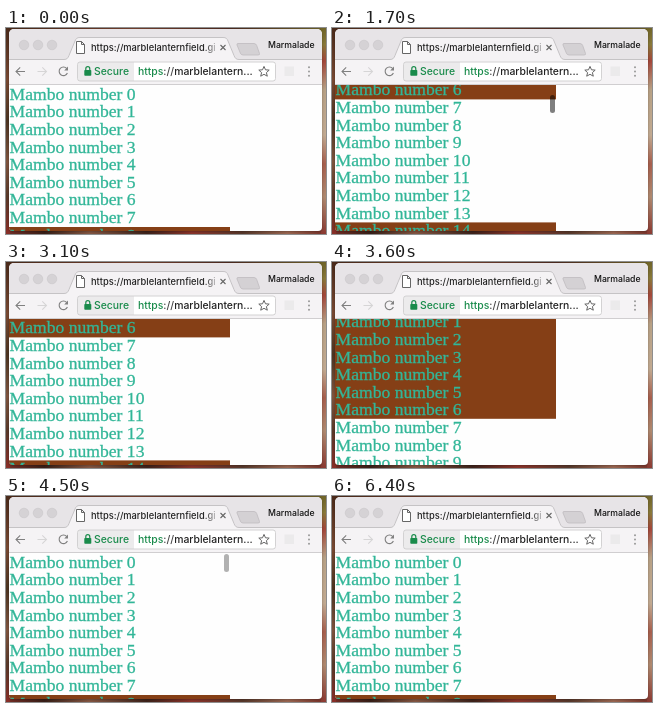
An HTML page that plays this animation: 320 by 206 pixels, repeating every 6500 ms.

```html
<!DOCTYPE html>
<html lang="en">
<head>
<meta charset="utf-8">
<title>Scrolling list</title>
<style>
  :root { --row: 17.6px; --loop: 6500ms; }
  html, body { margin: 0; width: 100%; height: 100%; overflow: hidden; }
  #stage {
    position: absolute; left: 0; top: 0; width: 320px; height: 206px; overflow: hidden;
    background:
      linear-gradient(#6f6429, #8a7a3a 8%, #a4473a 16%, #b9a286 30%, #c3ab92 52%, #a8604e 66%, #b08a70 82%, #8c3a32) right / 5px 100% no-repeat,
      linear-gradient(#4a2a1a, #7a4a33 25%, #4d3522 45%, #80553f 65%, #5a3a2a 82%, #8a2f28) left / 4px 100% no-repeat,
      linear-gradient(90deg, #7c3028, #3a2018 12%, #8a5a45 26%, #40241c 44%, #92362c 58%, #5a3a2c 74%, #a06a54 88%, #7a3028) bottom / 100% 4px no-repeat,
      linear-gradient(90deg, #4a2a1a, #74402e 40%, #4d2a20 70%, #6f6429);
  }
  #window {
    position: absolute; left: 3px; top: 1px; width: 313px; height: 202px;
    border-radius: 5px 5px 4px 4px; overflow: hidden; background: #fefefe;
    box-shadow: 0 1px 3px rgba(0, 0, 0, .3);
  }
  #chrome { position: absolute; left: -3px; top: -1px; }
  #chrome text { font-family: Inter, Roboto, sans-serif; font-weight: 500; }
  #view {
    position: absolute; left: 0; top: 56px; width: 221px; height: 146px;
    overflow: hidden; background: #853f16;
  }
  #list { position: absolute; left: 0; top: .8px; width: 100%; animation: scroll var(--loop) infinite; }
  #fresh {
    position: absolute; left: 0; width: 100%; background: #fefefe;
    animation: refresh var(--loop) step-end infinite;
  }
  #rows {
    position: relative; padding-left: .6px; color: #32b698; white-space: pre;
    font: 17.6px/var(--row) "Liberation Serif", Times, serif;
    -webkit-text-stroke: .3px #32b698;
  }
  #thumb {
    position: absolute; right: 1.5px; top: 1px; width: 5px; height: 17.5px; border-radius: 3px;
    background: #000; animation: thumb var(--loop) step-end infinite;
  }
  /* down from 0.6 s to 1.5 s, back up from 3.0 s to 4.0 s, in 0.1 s ticks */
  @keyframes scroll {
    0%, 9.22% { transform: translateY(0); animation-timing-function: steps(4); }
    15.37% { transform: translateY(-70.4px); animation-timing-function: steps(2); }
    18.45% { transform: translateY(-99px); animation-timing-function: steps(3); }
    23.06%, 46.14% { transform: translateY(-109.6px); animation-timing-function: steps(1); }
    47.68% { transform: translateY(-105.6px); animation-timing-function: steps(5); }
    55.37% { transform: translateY(-24.2px); animation-timing-function: steps(3); }
    59.98%, 100% { transform: translateY(0); }
  }
  @keyframes refresh {
    0%, 61.52% { top: -1px; height: calc(8 * var(--row) + 1px); }
    23.06% { top: calc(7 * var(--row)); height: calc(7 * var(--row)); }
  }
  @keyframes thumb {
    0% { opacity: 0; transform: none; }
    23.06% { opacity: .5; transform: translateY(9px); }
    29.22% { opacity: .35; transform: translateY(9px); }
    30.75% { opacity: .18; transform: translateY(9px); }
    32.29% { opacity: 0; transform: translateY(9px); }
    61.52% { opacity: .5; transform: none; }
    67.68% { opacity: .42; }
    69.21% { opacity: .3; }
    70.75% { opacity: .15; }
    72.29%, 100% { opacity: 0; transform: none; }
  }
</style>
</head>
<body>
<div id="stage">
  <div id="window">
    <div id="view">
      <div id="list"><div id="fresh"></div><div id="rows"></div></div>
      <div id="thumb"></div>
    </div>
    <svg id="chrome" width="320" height="57" viewBox="0 0 320 57">
      <defs>
        <linearGradient id="fade" gradientUnits="userSpaceOnUse" x1="198" x2="214" y1="0" y2="0">
          <stop stop-color="#222"/><stop offset="1" stop-color="#222" stop-opacity="0"/>
        </linearGradient>
      </defs>
      <rect width="320" height="32" fill="#e7e4e7"/>
      <g fill="#d5d2d5" stroke="#cac7ca" stroke-width=".6">
        <circle cx="18" cy="17" r="4.8"/><circle cx="32" cy="17" r="4.8"/><circle cx="46" cy="17" r="4.8"/>
      </g>
      <path d="M0 31.5H58C61 31.5 62 30 63 27.5L69 13C70 10.5 71 9.5 74 9.5H217C220 9.5 221 10.5 222 13L228 27.5C229 30 230 31.5 233 31.5H320V57H0Z" fill="#f5f3f5" stroke="#bcb9bc" stroke-width=".8"/>
      <path d="M232 15.5H248Q250 15.5 250.7 17.5L253.5 25.5Q254 27 252 27H237Q235 27 234.3 25L231 17Q230.5 15.5 232 15.5Z" fill="#d4d1d4" stroke="#bfbcbf" stroke-width=".8"/>
      <path d="M70.5 13.5H75.5L78.5 16.5V25.5H70.5ZM75.5 13.5V16.5H78.5" fill="#fff" stroke="#666" stroke-width="1"/>
      <text x="85" y="22.7" font-size="9.3" fill="url(#fade)">https://marblelanternfield.gi</text>
      <path d="M214.5 17L219.5 22M219.5 17L214.5 22" stroke="#666" stroke-width="1.1"/>
      <text x="262" y="20.3" font-size="8.7" fill="#111">Marmalade</text>

      <g fill="none" stroke="#808080" stroke-width="1.1">
        <path d="M19 43.5H10.3M14.2 39.3L10 43.5L14.2 47.7"/>
        <path d="M31.5 43.5H40.2M36.3 39.3L40.5 43.5L36.3 47.7" stroke="#d6d5d6"/>
        <path d="M60.8 40.6A4.3 4.3 0 1 0 61.4 45"/>
      </g>
      <path d="M62 38.6V42.4H58.2Z" fill="#808080"/>
      <rect x="71.5" y="34" width="198" height="19" rx="2.5" fill="#fff"/>
      <path d="M74 34H128V53H74Q71.5 53 71.5 50.5V36.5Q71.5 34 74 34Z" fill="#ecebec"/>
      <rect x="71.5" y="34" width="198" height="19" rx="2.5" fill="none" stroke="#cfcdcf" stroke-width=".9"/>
      <rect x="78.3" y="42" width="7" height="5.8" rx=".8" fill="#198b4b"/>
      <path d="M79.8 42.5V40.7A2 2 0 0 1 83.8 40.7V42.5" fill="none" stroke="#198b4b" stroke-width="1.2"/>
      <g font-size="10.4" fill="#198b4b">
        <text x="88" y="47.3">Secure</text>
        <text x="132" y="47.3">https<tspan fill="#444">://</tspan><tspan fill="#222">marblelantern...</tspan></text>
      </g>
      <path d="M258 38.4L259.5 41.8L263.2 42.1L260.4 44.6L261.3 48.2L258 46.3L254.7 48.2L255.6 44.6L252.8 42.1L256.5 41.8Z" fill="none" stroke="#666" stroke-width="1"/>
      <rect x="278.5" y="38.5" width="9.5" height="9.5" fill="#ebeaeb"/>
      <g fill="#999">
        <circle cx="303" cy="39.2" r="1"/><circle cx="303" cy="43.5" r="1"/><circle cx="303" cy="47.8" r="1"/>
      </g>
      <path d="M0 56.5H320" stroke="#cfcdcf" stroke-width=".9"/>
    </svg>
  </div>
</div>
<script>
  const labels = Array.from({ length: 17 }, (_, i) => `Mambo number ${i}`);
  document.getElementById("rows").textContent = labels.join("\n");
</script>
</body>
</html>
```
